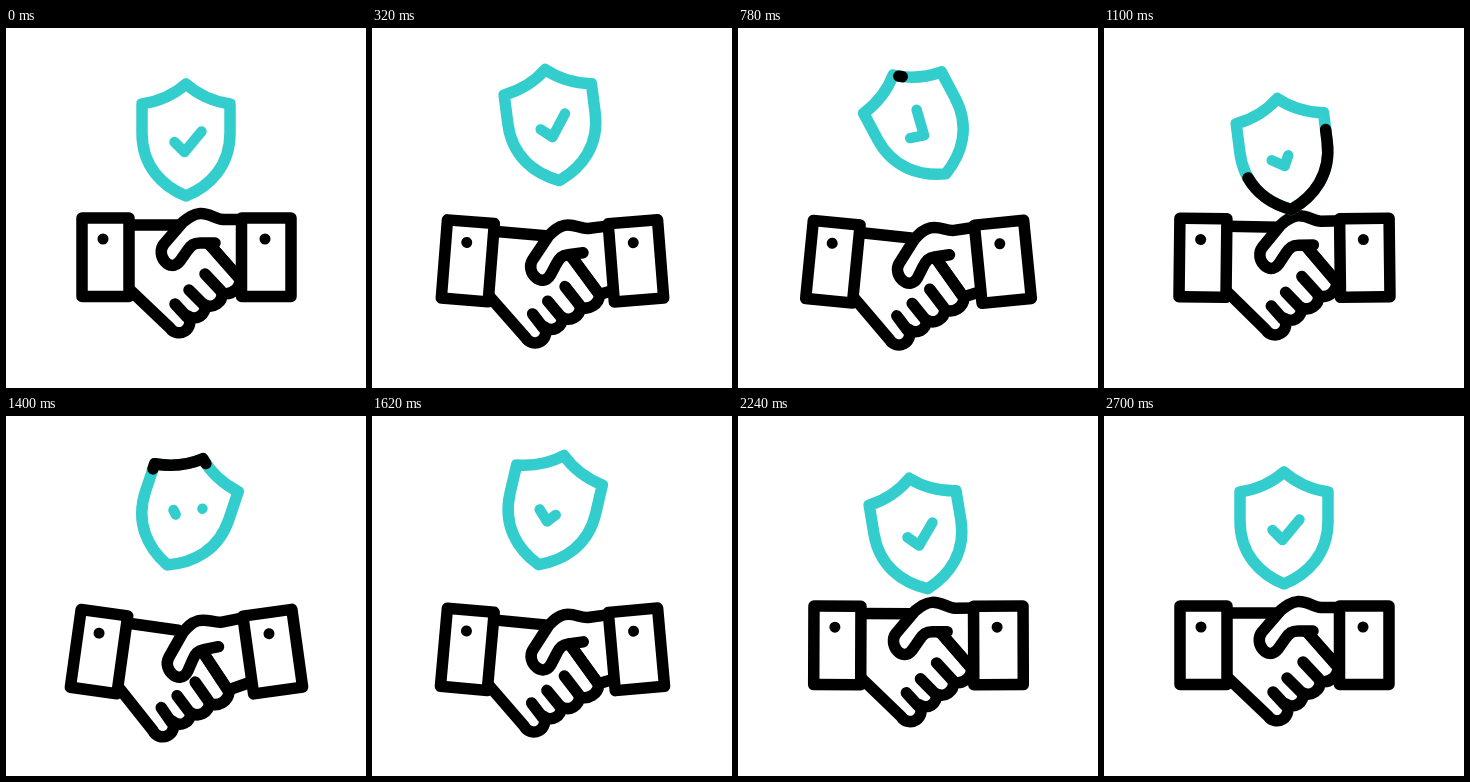
These frames come from a looping animation (360 by 360 pixels, 2.82 s). An HTML page:

```html
<!DOCTYPE html>
<html lang="en">
<head>
<meta charset="utf-8">
<title>Trusted handshake</title>
<style>
html, body { margin: 0; width: 100%; height: 100%; overflow: hidden; background: #fff; }
svg { display: block; width: 100%; height: 100%; }
path, rect { fill: none; stroke: #000; stroke-width: 11.5; stroke-linecap: round; stroke-linejoin: round; }
.skin { fill: #fff; }
.teal { stroke: #34cdce; }
#check { stroke-width: 10.5; }
</style>
</head>
<body>
<svg viewBox="0 0 360 360">
  <g id="palm"><path d="M216 260L236 256"/></g>
  <g id="fingers">
    <path class="skin" stroke="none" d="M123 197H175L204 217L234 251A14 14 0 0 1 216 265A12 12 0 0 1 199 277A11 11 0 0 1 182 288A10.500 10.500 0 0 1 164 300L123 261"/>
    <path d="M204 217L234 251M169 276L181 289M183 262L198 277M199 246L215 263"/>
  </g>
  <g id="thumb">
    <path class="skin" d="M240 191.500H217C209 191 204 185 194 185.500C187 186 182 190 177 194L158 216C149 227 164 246 174 233L181 223C185 217 188 215 194 215H209"/>
  </g>
  <g id="cuffL">
    <rect class="skin" x="76" y="190" width="47" height="78.500"/>
    <circle cx="97" cy="211" r="5.500"/>
  </g>
  <g id="cuffR">
    <rect class="skin" x="235.500" y="190" width="49.500" height="78.500"/>
    <circle cx="259" cy="211" r="5.500"/>
  </g>
  <g id="shield">
    <path id="rim" class="teal" pathLength="1" d="M180 56Q198 72 224 76V105C224 138 204 158 180 168C156 158 136 138 136 105V76Q162 72 180 56Z"/>
    <path id="check" class="teal" pathLength="1" d="M168.500 114L178.500 124L195.500 103.500"/>
  </g>
</svg>
<script>
const LOOP = 2820, STEP = 20;
const $ = id => document.getElementById(id);
const place = (id, transform) => $(id).setAttribute('transform', transform);

// The runner is a second stroke over the shield rim.
const runner = $('rim').cloneNode();
runner.id = 'runner';
runner.removeAttribute('class');
$('rim').after(runner);

// Sine ease from 0 to 1 between two times.
function ramp(t, from, to) {
  const u = Math.min(1, Math.max(0, (t - from) / (to - from)));
  return (1 - Math.cos(Math.PI * u)) / 2;
}

function swing(side, amount) {
  const centre = 180 + side * 80.5;
  return `translate(${side * 7 * amount} ${6.8 * amount}) rotate(${-side * 8.5 * amount} ${centre} 229.5)`;
}

function trim(el, start, end) {
  const length = Math.max(end - start, 0);
  el.setAttribute('stroke-dasharray', `${length} ${1 - length}`);
  el.setAttribute('stroke-dashoffset', -start);
}

function drawHands(t) {
  const shake = ramp(t, 0, 575) - .88 * ramp(t, 575, 1100)
    + .88 * ramp(t, 1100, 1460) - .92 * ramp(t, 1460, 1840) - .08 * ramp(t, 1840, 2700);
  const cuff = Math.max(shake, 0) ** 1.2;
  place('cuffL', swing(-1, cuff));
  place('cuffR', swing(1, cuff));
  place('fingers', swing(-1, shake));
  place('palm', swing(1, shake));
  place('thumb', `${swing(1, shake)} translate(${-2 * shake} 0) rotate(${-3.5 * shake} 240 215)`);
}

function drawShield(t) {
  const lift = 27 * ramp(t, 0, 600) - 41 * ramp(t, 600, 1100)
    + 37 * ramp(t, 1100, 1520) - 32 * ramp(t, 1520, 1900) + 9 * ramp(t, 1900, 2700);
  const tilt = -28 * ramp(t, 80, 780) + 48 * ramp(t, 780, 1480)
    - 34 * ramp(t, 1480, 1950) + 14 * ramp(t, 1950, 2700);
  place('shield', `translate(0 ${-lift}) rotate(${tilt} 180 109)`);

  const lean = -28 * (ramp(t, 150, 800) - ramp(t, 800, 1400));
  place('check', `rotate(${lean} 178.5 123)`);
  const shown = 1 - .88 * (ramp(t, 850, 1400) - ramp(t, 1400, 1810));
  trim($('check'), 0, shown);

  const head = ramp(t, 740, 1340), tail = ramp(t, 900, 1600), lead = .018;
  trim(runner, tail + lead, head + lead);
  runner.style.display = head > tail ? '' : 'none';
}

function draw(t) {
  drawHands(t);
  drawShield(t);
}

const begin = performance.now();
function tick() {
  const t = (performance.now() - begin) % LOOP;
  draw(Math.floor(t / STEP) * STEP);
  requestAnimationFrame(tick);
}
draw(0);
requestAnimationFrame(tick);
</script>
</body>
</html>
```
